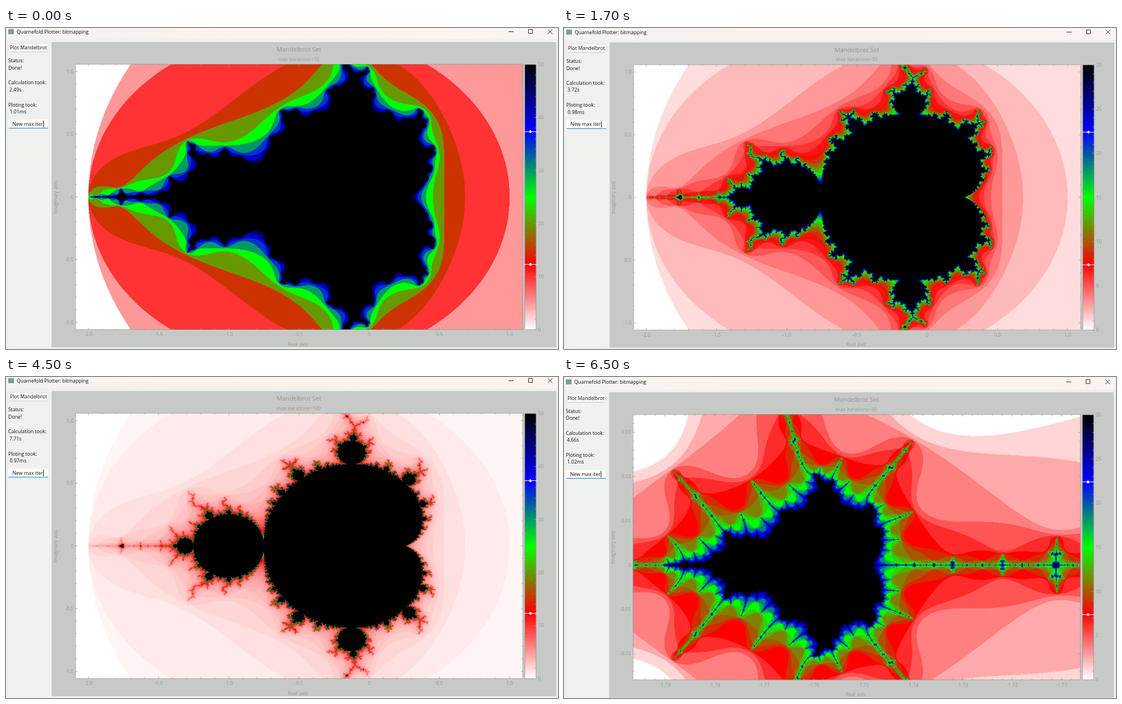
Animation, 981 px wide and 571 px high, one loop 8 s. Source, as an HTML page with a canvas:

```html
<!DOCTYPE html>
<html lang="en">
<head>
<meta charset="utf-8">
<title>Quarnefold Plotter</title>
<style>
  html, body { margin: 0; width: 100%; height: 100%; overflow: hidden; background: #eff1ee; }
  #stage { position: relative; width: 100%; height: 100%; overflow: hidden; contain: strict; }
  .scene { position: absolute; left: 0; top: 0; width: 981px; height: 571px; visibility: hidden; }
  .scene canvas { position: absolute; left: 123px; top: 64px; width: 796px; height: 473px; }
  .scene svg { position: absolute; left: 0; top: 0; overflow: visible; }
  text { font-family: "Open Sans", "Noto Sans", sans-serif; white-space: pre; }
</style>
</head>
<body>
<div id="stage"></div>
<script>
const LOOP = 8000;
const GREY = '#969696';
const PIXEL = 0.73; // size of one screen pixel of the window on the stage
const BOX = { x: 123, y: 64, w: 796, h: 473 };
const BAR = { x: 922, y: 65, w: 20, h: 471.5 };
const STOPS = [[255, 255, 255], [255, 0, 0], [0, 255, 0], [0, 0, 255], [0, 0, 0]];

// View: pixel origin and scale of each axis
const FULL = { re0: 0, x0: 645.5, sx: 249.6, y0: 300.5, sy: 223, step: 0.5, digits: 1 };
const ZOOM = { re0: -1.75, x0: 532.7, sx: 8812, y0: 332.4, sy: 7875, step: 0.01, digits: 2 };

// dx, dy: window shift in screen pixels
const SCENES = [
  { at: 0, iter: 10, top: 50, calc: '2.49s', plot: '1.01ms', dx: 0, dy: 0, view: FULL },
  { at: 500, iter: 30, top: 30, calc: '3.72s', plot: '0.98ms', dx: 0, dy: 1, view: FULL },
  { at: 2500, iter: 50, top: 50, calc: '4.82s', plot: '1.08ms', dx: -1, dy: 2, view: FULL },
  { at: 4500, iter: 100, top: 50, calc: '7.71s', plot: '0.97ms', dx: 0, dy: 0, view: FULL },
  { at: 6500, iter: 30, top: 30, calc: '4.66s', plot: '1.02ms', dx: -1, dy: 3, view: ZOOM }
];

function colour(f) {
  const i = Math.min(3, Math.floor(f * 4)), k = f * 4 - i;
  return STOPS[i].map((c, n) => Math.round(c + (STOPS[i + 1][n] - c) * k));
}

function escapeCount(cr, ci, max) {
  let r = cr, i = ci, n = 0;
  while (n < max) {
    const rr = r * r, ii = i * i;
    if (rr + ii > 4) break;
    i = 2 * r * i + ci;
    r = rr - ii + cr;
    n++;
  }
  return n;
}

// Drawn at screen resolution and scaled down by CSS
function drawSet(canvas, view, max) {
  const w = canvas.width = Math.round(BOX.w / PIXEL);
  const h = canvas.height = Math.round(BOX.h / PIXEL);
  const counts = new Uint8Array(w * h);
  let min = max;
  for (let py = 0, p = 0; py < h; py++) {
    const im = (view.y0 - BOX.y - (py + 0.5) * BOX.h / h) / view.sy;
    for (let px = 0; px < w; px++, p++) {
      const re = view.re0 + (BOX.x + (px + 0.5) * BOX.w / w - view.x0) / view.sx;
      const n = counts[p] = escapeCount(re, im, max);
      if (n < min) min = n;
    }
  }
  const lut = [];
  for (let n = min; n <= max; n++) lut[n] = colour((n - min) / (max - min));
  const ctx = canvas.getContext('2d'), img = ctx.createImageData(w, h);
  counts.forEach((n, p) => {
    const c = lut[n], q = p * 4;
    img.data[q] = c[0];
    img.data[q + 1] = c[1];
    img.data[q + 2] = c[2];
    img.data[q + 3] = 255;
  });
  ctx.putImageData(img, 0, 0);
}

const rect = (x, y, w, h, fill, extra = '') =>
  `<rect x="${x}" y="${y}" width="${w}" height="${h}" fill="${fill}" ${extra}/>`;
const path = (d, stroke, width = 1) =>
  `<path d="${d}" fill="none" stroke="${stroke}" stroke-width="${width}"/>`;
const text = (x, y, s, fill = '#111', anchor = 'start', size = 8.75, extra = '') =>
  `<text x="${x}" y="${y + size * 0.357}" font-size="${size}" fill="${fill}" text-anchor="${anchor}" ${extra}>${s}</text>`;

// Calls fn(value, isMajor) for every tick between lo and hi
function ticks(lo, hi, step, fn) {
  const minor = step / 5;
  for (let k = Math.ceil(lo / minor); k * minor <= hi; k++) fn(k * minor, k % 5 === 0);
}

function background() {
  return rect(-2, -4, 985, 24, 'url(#title)') + rect(81, 25, 897, 543, '#c7c9c6');
}

function windowChrome() {
  return rect(4, 2, 10, 9, '#7d9c98') +
    text(19, 6.8, 'Quarnefold Plotter: bitmapping') +
    path('M893 6.5h9M928.5 2.5h7v7h-7zM963 2.5l8 8m0 -8l-8 8', '#222');
}

function sidebar(s) {
  return rect(5.5, 27.5, 69, 15, '#fafbfa', 'rx="2.5" stroke="#dfe0de"') +
    path('M7 42.5h66', '#c9cac8') +
    text(7, 35.2, 'Plot Mandelbrot') +
    text(4, 58.3, 'Status:') + text(4, 70.8, 'Done!') +
    text(4, 97.2, 'Calculation took:') + text(6, 109.5, s.calc) +
    text(4, 136.4, 'Ploting took:') + text(6.5, 149, s.plot) +
    rect(4, 163, 71, 15.5, '#fff', 'rx="2.5"') +
    path('M4.5 178.2h70.5', '#2f8fd0', 1.2) +
    text(11.5, 170.6, 'New max iter') + path('M66.5 164.5v12', '#111');
}

function axes(s) {
  const v = s.view, r = BOX.x + BOX.w, b = BOX.y + BOX.h;
  const reAt = x => v.re0 + (x - v.x0) / v.sx;
  const label = val => Math.abs(val) < 1e-9 ? '0' : val.toFixed(v.digits);
  let d = `M${BOX.x + 0.5} ${BOX.y + 0.5}H${r - 0.5}V${b - 0.5}H${BOX.x + 0.5}z`, out = '';
  ticks(reAt(BOX.x), reAt(r), v.step, (val, major) => {
    const x = v.x0 + (val - v.re0) * v.sx, len = major ? 4 : 2.5;
    d += `M${x} ${BOX.y}v${len}M${x} ${b}v${-len}`;
    if (major) out += text(x, 545.3, label(val), GREY, 'middle');
  });
  ticks((v.y0 - b) / v.sy, (v.y0 - BOX.y) / v.sy, v.step, (val, major) => {
    const y = v.y0 - val * v.sy, len = major ? 4 : 2.5;
    d += `M${BOX.x} ${y}h${len}M${r} ${y}h${-len}`;
    if (major) out += text(120, y, label(val), GREY, 'end');
  });
  return path(d, GREY, 0.8) + out +
    text(520.5, 38.3, 'Mandelbrot Set', GREY, 'middle', 11.1) +
    text(520, 55.5, 'max iterations=' + s.iter, GREY, 'middle') +
    text(519, 562.5, 'Real axis', GREY, 'middle') +
    text(0, 0, 'Imaginary axis', GREY, 'middle', 8.75, 'transform="translate(88 301) rotate(-90)"');
}

function colourBar(s) {
  const r = BAR.x + BAR.w, b = BAR.y + BAR.h;
  let d = `M${BAR.x} ${BAR.y}H${r}V${b}H${BAR.x}z`, out = '';
  ticks(0, s.top, s.top === 50 ? 10 : 5, (val, major) => {
    const y = b - BAR.h * val / s.top;
    d += `M${r} ${y}h${major ? -4 : -2.5}`;
    if (major) out += text(945.5, y, val.toFixed(0), GREY);
  });
  out += path(d, GREY, 0.8);
  for (const y of [184.5, 420.5]) {
    out += path(`M${BAR.x - 1} ${y}H${r + 1}`, '#fff') +
      `<path d="M932 ${y - 3}l3 3l-3 3l-3 -3z" fill="#fff"/>`;
  }
  return rect(BAR.x, BAR.y, BAR.w, BAR.h, 'url(#map)') + out;
}

function gradient(id, colours, dir) {
  const stops = colours.map((c, i) =>
    `<stop offset="${i / (colours.length - 1)}" stop-color="${c}"/>`).join('');
  return `<linearGradient id="${id}" ${dir}>${stops}</linearGradient>`;
}

const stage = document.getElementById('stage');
const svg = body => `<svg width="981" height="571">${body}</svg>`;
const defs = '<defs>' +
  gradient('title', ['#f4f3f1', '#fcf2ec', '#f9f4f1'], 'x2="1"') +
  gradient('map', STOPS.map(c => `rgb(${c})`), 'x1="0" y1="1" x2="0" y2="0"') + '</defs>';
stage.innerHTML = `<svg width="0" height="0" style="position:absolute">${defs}</svg>`;

for (const s of SCENES) {
  s.el = document.createElement('div');
  s.el.className = 'scene';
  s.el.style.transform = `translate(${s.dx * PIXEL}px, ${s.dy * PIXEL}px)`;
  s.el.innerHTML = svg(background()) + '<canvas></canvas>' +
    svg(windowChrome() + sidebar(s) + axes(s) + colourBar(s));
  drawSet(s.el.querySelector('canvas'), s.view, s.iter);
  stage.append(s.el);
}

const start = performance.now();
function frame() {
  const t = Math.max(0, performance.now() - start) % LOOP;
  const current = SCENES.filter(s => s.at <= t).pop();
  for (const s of SCENES) s.el.style.visibility = s === current ? 'visible' : 'hidden';
  requestAnimationFrame(frame);
}
frame();
</script>
</body>
</html>
```
